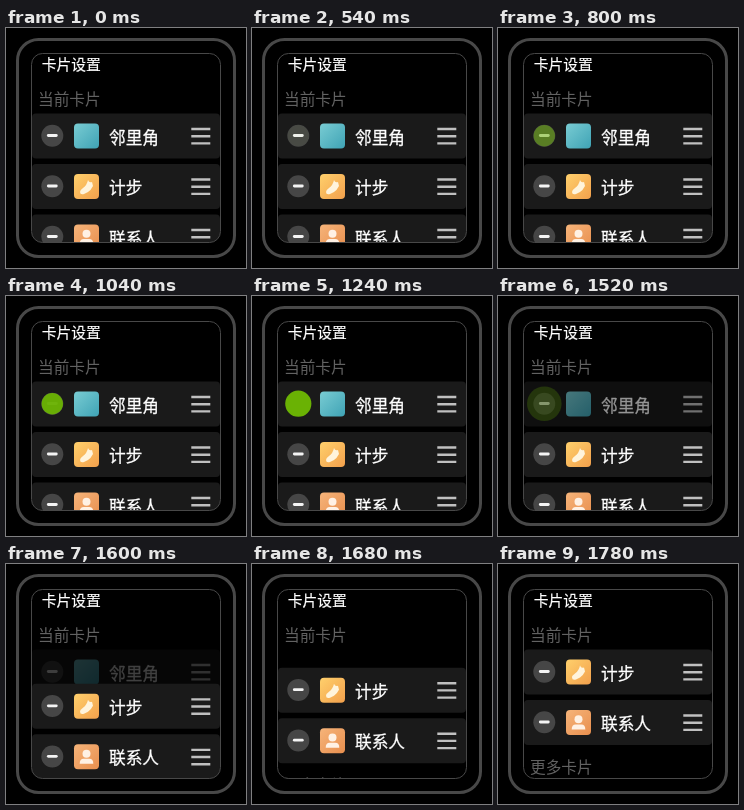
Recreate the animation shown at these times as an HTML page. Size 240 px wide and 240 px high, loop 2760 ms.

```html
<!DOCTYPE html>
<html lang="zh-CN">
<head>
<meta charset="utf-8">
<title>卡片设置</title>
<style>
  html, body { margin: 0; width: 100%; height: 100%; overflow: hidden; background: #000; }
  svg { display: block; width: 100vw; height: 100vh; }
  text { font-family: "Noto Sans CJK SC", "Noto Sans CJK", sans-serif; fill: #fff; }
  .name { font-size: 16.7px; stroke: #fff; stroke-width: .3px; }
  .title { font-size: 14.8px; stroke: #fff; stroke-width: .2px; }
  .label { font-size: 15.7px; fill: #626262; }
</style>
</head>
<body>
<svg viewBox="0 0 240 240">
  <defs>
    <clipPath id="screen"><rect x="25.5" y="25.5" width="189" height="189" rx="11"/></clipPath>
    <linearGradient id="teal" x2="1" y2="1"><stop stop-color="#79ccd3"/><stop offset="1" stop-color="#3fa3b5"/></linearGradient>
    <linearGradient id="amber" x2="1" y2="1"><stop stop-color="#ffd06c"/><stop offset="1" stop-color="#f2a04c"/></linearGradient>
    <linearGradient id="coral" x2="1" y2="1"><stop stop-color="#f6b47a"/><stop offset="1" stop-color="#e88f4e"/></linearGradient>
    <g id="row">
      <rect x="26" width="188" height="45" rx="4" fill="#1a1a1a"/>
      <circle cx="46.3" cy="22.2" r="11" fill="#464646"/>
      <path d="M42.3 22h8" stroke="#f4f4f4" stroke-width="2.8" stroke-linecap="round"/>
      <path d="M185.3 15.5h19m-19 7.2h19m-19 7.2h19" stroke="#c0c0c0" stroke-width="2.4"/>
    </g>
  </defs>
  <rect width="240" height="240"/>
  <rect x="11.5" y="11.5" width="217" height="217" rx="21" fill="none" stroke="#484848" stroke-width="3"/>
  <g clip-path="url(#screen)">
    <text x="35.7" y="41.5" class="title">卡片设置</text>
    <text x="32" y="76.5" class="label">当前卡片</text>
    <g id="first" transform="translate(0 85.5)">
      <use href="#row"/>
      <rect x="68" y="10" width="25" height="25" rx="4" fill="url(#teal)"/>
      <text x="103" y="30" class="name">邻里角</text>
    </g>
    <circle id="press" cx="46.3" cy="107.7" fill="#6ab204"/>
    <g id="rest">
      <g transform="translate(0 136)">
        <use href="#row"/>
        <rect x="68" y="10" width="25" height="25" rx="4" fill="url(#amber)"/>
        <path d="M82 16q1 3 4 2l1 4q-2 4-5 6l-4 2q-4 1-4-2 0-2 3-4 4-3 5-8z" fill="#fff4dc"/>
        <text x="103" y="30" class="name">计步</text>
      </g>
      <g transform="translate(0 186.5)">
        <use href="#row"/>
        <rect x="68" y="10" width="25" height="25" rx="4" fill="url(#coral)"/>
        <circle cx="80.5" cy="19.3" r="4" fill="#fff1e4"/>
        <path d="M73.7 29.5q0-5 4-5h5.6q4 0 4 5z" fill="#fff1e4"/>
        <text x="103" y="30" class="name">联系人</text>
      </g>
      <text x="32" y="259.5" class="label">更多卡片</text>
    </g>
  </g>
  <rect x="25.5" y="25.5" width="189" height="189" rx="11" fill="none" stroke="#484848"/>
</svg>
<script>
  const LOOP = 2760, STEP = 20, PITCH = 50.5;
  const [first, press, rest] = ["first", "press", "rest"].map(id => document.getElementById(id));
  const ramp = (t, from, to) => Math.min(1, Math.max(0, (t - from) / (to - from)));
  const start = performance.now();

  function draw() {
    const t = Math.floor((performance.now() - start) % LOOP / STEP) * STEP;
    // The button turns green, then swells and fades along with its row.
    press.setAttribute("opacity", ramp(t, 520, 1060) * (1 - ramp(t, 1320, 1580)));
    press.setAttribute("r", 10.7 + 7.8 * ramp(t, 1080, 1600));
    first.setAttribute("opacity", 1 - ramp(t, 1420, 1660));
    rest.setAttribute("transform", `translate(0 ${-PITCH * ramp(t, 1520, 1770)})`);
    requestAnimationFrame(draw);
  }
  draw();
</script>
</body>
</html>
```
